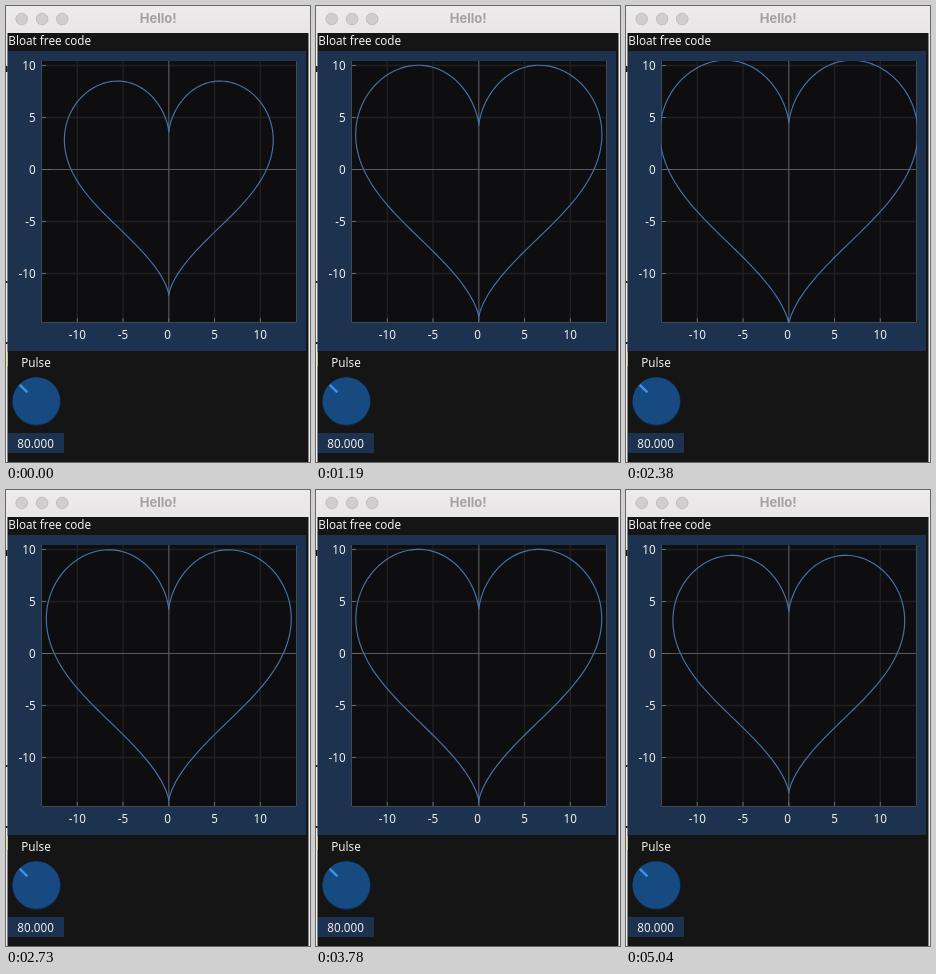
Write an HTML page that moves like this. It is 304 by 456 pixels and loops after 5.11 s.

```html
<!DOCTYPE html>
<html lang="en">
<head>
<meta charset="utf-8">
<title>Hello!</title>
<style>
  html, body { margin: 0; width: 100%; height: 100%; overflow: hidden; background: #151515; }
  svg { display: block; width: 304px; height: 456px; }
  text { font: 11.7px "Noto Sans", "Open Sans", sans-serif; fill: #f0f0f0; }
  .title { font: 700 13px Inter, sans-serif; fill: #a3a1a2; }
  .grid { stroke: #202023; stroke-width: 1.4; }
  .zero { stroke: #58585b; stroke-width: 1.2; }
  .tick { stroke: #626a75; }
</style>
</head>
<body>
<svg viewBox="0 0 304 456">
  <defs>
    <linearGradient id="bar" x2="0" y2="1">
      <stop stop-color="#edebec"/><stop offset="1" stop-color="#e7e5e6"/>
    </linearGradient>
    <clipPath id="plot"><rect x="35" y="55" width="256" height="262"/></clipPath>
  </defs>

  <rect width="304" height="456" fill="#f0f0f0"/>
  <rect x="1.5" y="27" width="301" height="429" fill="#151515"/>
  <rect width="304" height="27" fill="url(#bar)"/>
  <g fill="#cfcdce" stroke="#b8b6b7" stroke-width=".8">
    <circle cx="15.7" cy="13" r="5.8"/>
    <circle cx="36.1" cy="13" r="5.8"/>
    <circle cx="56.2" cy="13" r="5.8"/>
  </g>
  <text class="title" x="152.2" y="17.3" text-anchor="middle">Hello!</text>

  <rect y="346" width="1.5" height="14" fill="#efebb8"/>
  <path d="M0 60h1.5v6h-1.5zM0 275h1.5v2h-1.5zM0 336h1.5v2h-1.5z" fill="#111"/>

  <text x="2.3" y="39">Bloat free code</text>
  <rect x="2" y="45" width="298" height="300" fill="#1d324e"/>
  <rect x="35" y="55" width="256" height="262" fill="#0e0e10"/>
  <g id="axes"></g>
  <path d="M35.5 55V316.5H290.5V55" fill="none" stroke="#414a57"/>
  <path id="heart" fill="none" stroke="#4672ab" stroke-width="1.15" clip-path="url(#plot)"/>

  <text x="15.3" y="360.5">Pulse</text>
  <circle cx="30.5" cy="395.6" r="24.2" fill="#10294a"/>
  <circle cx="30.3" cy="395" r="23.8" fill="#164a80"/>
  <path d="M13.8 378.8L21.4 386.4" stroke="#3a93ee" stroke-width="2.4"/>
  <rect x="2" y="427" width="56" height="20" fill="#1d324e"/>
  <text x="11.3" y="441.8">80.000</text>
</svg>
<script>
const STEP = 70, LOOP = 5110;
const px = x => 162.8 + 9.15 * x;
const py = y => 163.5 - 10.4 * y;
const line = (x1, y1, x2, y2, cls) =>
  `<path class="${cls}" d="M${x1} ${y1}L${x2} ${y2}"/>`;
const label = (x, y, anchor, v) =>
  `<text x="${x}" y="${y}" text-anchor="${anchor}">${v}</text>`;

let axes = "";
const values = [-10, -5, 5, 10, 0];
for (const v of values) {
  const x = px(v), y = py(v), cls = v ? "grid" : "zero";
  axes += line(x, 55, x, 316, cls) + line(36, y, 290, y, cls);
}
for (const v of values) {
  const x = px(v), y = py(v);
  axes += line(x, 312, x, 317, "tick") + line(35, y, v ? 40 : 45, y, "tick");
  axes += label(v ? x : x - 1.2, 333, "middle", v) + label(29.7, y + 4.2, "end", v);
}
document.getElementById("axes").innerHTML = axes;

// Unit heart curve, sampled once
const curve = Array.from({ length: 241 }, (_, i) => {
  const t = i / 240 * 2 * Math.PI, c = n => Math.cos(n * t);
  return [16 * Math.sin(t) ** 3, 13 * c(1) - 5 * c(2) - 2 * c(3) - c(4)];
});

// Beat phase in degrees at given steps; the tempo drifts a little
const beats = [[0, 0], [17, 828.7], [34, 1662.6], [45, 2198], [54, 2628], [63, 3073], [72, 3521]];
function phase(step) {
  const i = beats.findIndex(b => b[0] >= step);
  if (i === 0) return 0;
  const [s0, a0] = beats[i - 1], [s1, a1] = beats[i];
  return a0 + (a1 - a0) * (step - s0) / (s1 - s0);
}

const heart = document.getElementById("heart");
let shown = -1;
function draw(now) {
  const step = Math.floor((now % LOOP) / STEP);
  if (step !== shown) {
    shown = step;
    const size = 0.81 - 0.0965 * Math.cos(phase(step) * Math.PI / 180);
    heart.setAttribute("d", "M" + curve.map(([x, y]) =>
      px(x * size).toFixed(2) + " " + py(y * size).toFixed(2)).join("L"));
  }
}
const start = performance.now();
function tick() {
  draw(performance.now() - start);
  requestAnimationFrame(tick);
}
tick();
</script>
</body>
</html>
```
